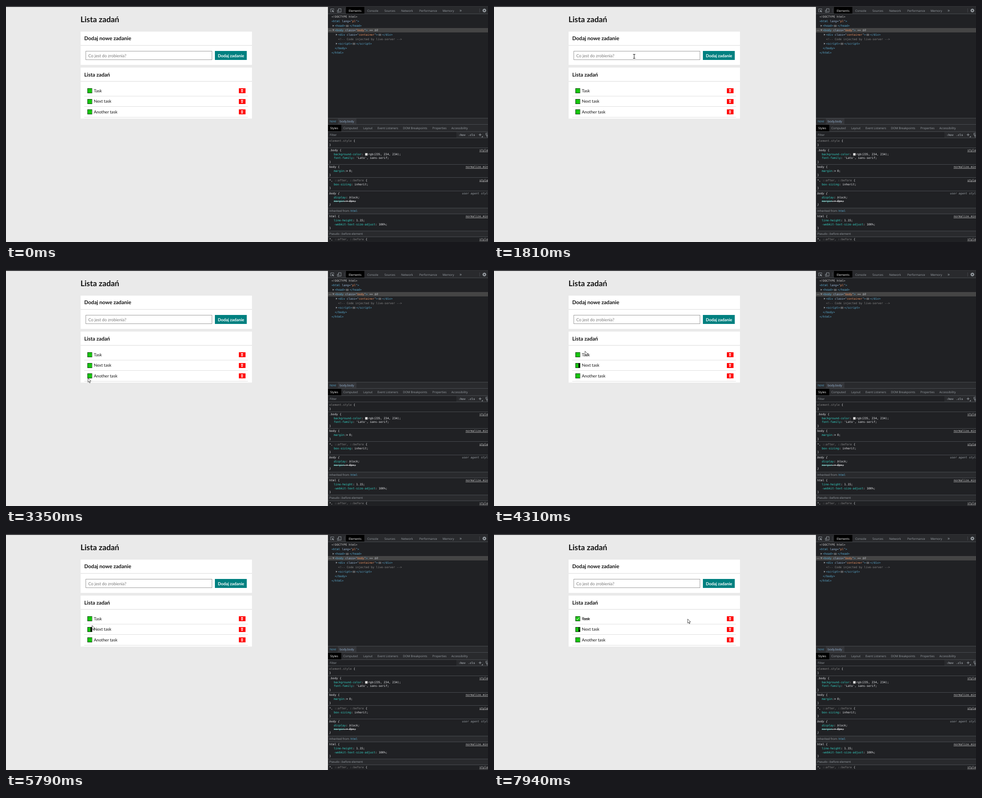
An HTML page with a canvas for the animation above (7990 ms loop, 1066x525 px).

```html
<!DOCTYPE html>
<html lang="pl">
<head>
<meta charset="utf-8">
<title>Lista zadań</title>
<style>
html, body { margin: 0; width: 100%; height: 100%; overflow: hidden; background: #eaeaea; }
canvas { display: block; }
</style>
</head>
<body>
<canvas id="stage" width="1066" height="525"></canvas>
<script>
const W = 1066, H = 525, LOOP = 7990;
const stage = document.getElementById('stage').getContext('2d');
const backdrop = document.createElement('canvas');
backdrop.width = W;
backdrop.height = H;
let g = backdrop.getContext('2d');

const lato = (px, weight = 400) => `${weight} ${px}px Lato, sans-serif`;
const UI = '6.5px "Open Sans", sans-serif';
const MONO = '6.34px "DejaVu Sans Mono", monospace';
const CHAR = 3.817;
const PANEL = '#202124', BAR = '#292a2d', EDGE = '#494c50';
const LIGHT = '#e8eaed', GREY = '#9aa0a6', TAG = '#5db0d7', ATTR = '#9bbbdc',
      VALUE = '#f29766', PROP = '#35d4c7', DIM = '#898989';

function box(x, y, w, h, color) {
  g.fillStyle = color;
  g.fillRect(x, y, w, h);
}

function frame(x, y, w, h, color, width = 1) {
  g.strokeStyle = color;
  g.lineWidth = width;
  g.strokeRect(x, y, w, h);
}

function text(str, x, y, font, color) {
  g.textRendering = 'geometricPrecision';
  g.font = font;
  g.fillStyle = color;
  g.fillText(str, x, y);
}

function shape(points, fill, stroke, width = 1) {
  g.beginPath();
  points.forEach(([x, y]) => g.lineTo(x, y));
  if (fill) {
    g.closePath();
    g.fillStyle = fill;
    g.fill();
  }
  if (stroke) {
    g.strokeStyle = stroke;
    g.lineWidth = width;
    g.stroke();
  }
}

// Draws coloured monospace runs, y being the middle of the line.
function code(x, y, ...runs) {
  for (const [str, color, style = ''] of runs) {
    text(str, x, y + 2.2, `${style} ${MONO}`, color);
    x += str.length * CHAR;
  }
  return x;
}

function triangle(x, y, open) {
  shape(open ? [[x - 2, y - 1.5], [x + 2, y - 1.5], [x, y + 2]]
             : [[x - 1.3, y - 2], [x + 1.8, y], [x - 1.3, y + 2]], GREY);
}

function pill(x, y) {
  g.beginPath();
  g.roundRect(x, y - 2.5, 7, 5.5, 2);
  g.fillStyle = '#45474a';
  g.fill();
  for (let i = 0; i < 3; i++) box(x + 1.2 + i * 1.8, y, 1, 1, '#bdc1c6');
}

function tabs(y, entries) {
  entries.forEach(([label, x], i) => text(label, x, y, UI, i ? GREY : '#ffffff'));
}

function drawPage() {
  box(0, 0, W, H, '#eaeaea');
  box(0, 0, W, 2, '#2d2d30');
  text('Lista zadań', 164.7, 36, lato(17.34, 700), '#111');

  box(165, 57, 379, 74, '#fff');
  box(165, 87, 379, 1.2, '#dedede');
  text('Dodaj nowe zadanie', 173, 76, lato(11.56, 700), '#111');
  frame(176.5, 100.5, 279, 19, '#999');
  text('Co jest do zrobienia?', 182, 113.7, lato(9.25), '#757575');
  box(462, 100, 70.5, 20, '#008080');
  text('Dodaj zadanie', 468.5, 113.5, lato(9.25, 700), '#fff');

  box(165, 137, 379, 113.5, '#fff');
  box(165, 167, 379, 1.2, '#dedede');
  text('Lista zadań', 173, 156.6, lato(11.56, 700), '#111');
  ['Task', 'Next task', 'Another task'].forEach((name, i) => {
    const y = 188.4 + i * 23.6;
    frame(180.5, Math.round(y - 5.4) + .5, 9.6, 10, '#0b3a0b');
    box(181, Math.round(y - 5.4) + 1, 8.7, 9, '#16c60c');
    text(name, 194.3, y + 3.2, lato(9.25), '#111');
    box(515, Math.round(y - 5.4), 14.7, 11, '#f00');
    frame(520.5, y - 2, 3, 5, '#fff', .9);
    box(519.5, y - 3.2, 5, 1, '#fff');
    box(521.7, y - 1, .7, 3.5, '#fff');
    box(173, Math.round(y + 11.4), 362, 1, '#dedede');
  });
}

function drawToolbar() {
  box(712, 2, W - 712, 523, PANEL);
  box(712, 2, W - 712, 15, BAR);
  box(712, 17, W - 712, 1, EDGE);
  box(752, 2, 40.5, 15, '#000');
  tabs(12.5, [['Elements', 758], ['Console', 799], ['Sources', 837], ['Network', 874],
    ['Performance', 914], ['Memory', 965.5]]);
  text('»', 1003, 12.5, '10px "Open Sans", sans-serif', GREY);
  shape([[720, 13], [718, 13], [718, 6.5], [725, 6.5], [725, 8.5]], null, GREY, .9);
  shape([[720.5, 9], [726, 11], [723.7, 11.8], [725.5, 13.7], [724.5, 14.3], [723, 12.5], [722, 14]], GREY);
  frame(735.5, 6, 5.5, 7.5, GREY, .9);
  box(732.5, 9, 4, 5.5, BAR);
  frame(733, 9.3, 3, 4.6, GREY, .9);
  box(748, 5.5, .8, 9, EDGE);
  box(1047, 5.5, .8, 9, EDGE);
  g.strokeStyle = GREY;
  g.lineWidth = 2;
  g.beginPath();
  g.arc(1058, 10, 2.5, 0, 7);
  g.stroke();
  for (let i = 0; i < 8; i++) {
    const a = i * Math.PI / 4;
    shape([[1058 + 3 * Math.cos(a), 10 + 3 * Math.sin(a)],
           [1058 + 4.3 * Math.cos(a), 10 + 4.3 * Math.sin(a)]], null, GREY, 1.5);
  }
}

function drawTree() {
  const row = i => 24 + i * 9.95;
  const folded = (x, y, name, attrs = []) => {
    triangle(x - 3.5, y);
    const end = code(x, y, ['<' + name, TAG], ...attrs, ['>', TAG]);
    pill(end + 1, y);
    code(end + 9.8, y, [`</${name}>`, TAG]);
  };
  const attr = (name, value) => [[` ${name}`, ATTR], ['="', ATTR], [value, VALUE], ['"', ATTR]];

  box(712, 49, W - 712, 9.8, '#454545');
  code(720, row(0), ['<!DOCTYPE html>', '#d0d0d0']);
  code(720, row(1), ['<html', TAG], ...attr('lang', 'pl'), ['>', TAG]);
  folded(727.3, row(2), 'head');
  for (let i = 0; i < 3; i++) box(714 + i * 2.2, row(3), 1.1, 1.1, GREY);
  triangle(724, row(3), true);
  code(727.3, row(3), ['<body', TAG], ...attr('class', 'body'), ['>', TAG],
    [' == ', '#bdc1c6'], ['$0', '#bdc1c6', 'italic']);
  folded(734.5, row(4), 'div', attr('class', 'container'));
  code(734.5, row(5), ['<!-- Code injected by live-server -->', DIM]);
  folded(734.5, row(6), 'script');
  code(727.3, row(7), ['</body>', TAG]);
  code(720, row(8), ['</html>', TAG]);
}

function drawStyleBars() {
  box(712, 249, W - 712, 44, BAR);
  box(712, 249, W - 712, 1, EDGE);
  box(734, 250, 41, 13, '#35363a');
  text('html', 716, 258.7, UI, TAG);
  text('body.body', 738, 258.7, UI, ATTR);
  box(712, 263, W - 712, 1, EDGE);
  box(712, 264, 29.5, 15, '#000');
  tabs(273.8, [['Styles', 717], ['Computed', 746], ['Layout', 790], ['Event Listeners', 821.5],
    ['DOM Breakpoints', 878], ['Properties', 943], ['Accessibility', 985]]);
  box(712, 279, W - 712, 1, EDGE);
  box(712, 280, 284, 13, PANEL);
  text('Filter', 716, 289, UI, GREY);
  code(1001, 286.5, [':hov', GREY, 'bold']);
  code(1022, 286.5, ['.cls', GREY, 'bold']);
  box(1045.5, 286, 6, 1, GREY);
  box(1048, 283.5, 1, 6, GREY);
  shape([[1054.5, 289], [1054.5, 292], [1051.5, 292]], GREY);
  frame(1061.5, 283, 6, 4, GREY, .9);
  frame(1063.5, 287, 3, 4, GREY, .9);
  box(712, 293, W - 712, 1, EDGE);
}

function drawRules() {
  const line = y => box(712, y, W - 712, 1, EDGE);
  const selector = (y, str, color = LIGHT, style) => code(715, y, [str, color, style], [' {', LIGHT, style]);
  const close = (y, style) => code(715, y, ['}', LIGHT, style]);
  const prop = (y, name, value, style) =>
    code(725, y, [name, PROP, style], [': ', LIGHT, style], [value, LIGHT, style]);
  const margin = (y, value, style) => {
    code(725, y, ['margin', PROP, style], [':', LIGHT, style]);
    triangle(754.5, y);
    code(759, y, [value, LIGHT, style]);
  };
  const link = (y, str) => {
    const x = W - str.length * CHAR;
    code(x, y, [str, '#d0d0d0']);
    box(x, y + 3, W - x, .7, '#d0d0d0');
  };
  const everything = y => {
    code(715, y, ['*, ', LIGHT], ['::after, ::before', DIM], [' {', LIGHT]);
    link(y, 'style');
  };
  const band = (y, str) => {
    box(712, y, W - 712, 13, BAR);
    line(y);
    line(y + 13);
    text(str, 715, y + 9, UI, GREY);
  };

  selector(300, 'element.style', DIM);
  close(309);
  line(315);

  selector(321, '.body');
  link(321, 'style');
  code(725, 330, ['background-color', PROP], [':', LIGHT]);
  box(794, 327, 6, 6, '#777');
  box(794.7, 327.7, 4.6, 4.6, '#ebeaea');
  code(801, 330, ['rgb(235, 234, 234);', LIGHT]);
  prop(338, 'font-family', "'Lato', sans-serif;");
  close(346.5);
  line(352);

  selector(358, 'body');
  link(358, 'normalize.min');
  margin(367, '0;');
  close(376);
  line(381);

  everything(387.5);
  prop(396.5, 'box-sizing', 'inherit;');
  close(405);
  line(411);

  selector(417, 'body', LIGHT, 'italic');
  code(1008.5, 417, ['user agent stylesheet', GREY, 'italic']);
  prop(426, 'display', 'block;', 'italic');
  margin(434, '8px;', 'italic');
  box(725, 434, 49, .8, LIGHT);
  close(442, 'italic');

  band(449, 'Inherited from');
  code(762, 456, ['html', TAG]);
  selector(468, 'html');
  link(468, 'normalize.min');
  prop(477, 'line-height', '1.15;');
  prop(485.5, '-webkit-text-size-adjust', '100%;');
  close(494);

  band(500, 'Pseudo ::before element');
  everything(519);
}

// Each move: first step time, last step time, step count, evenly paced path.
const moves = [
  [230, 370, 3, [[865, 460], [744, 385], [622, 306], [518, 247]]],
  [590, 800, 4, [[518, 247], [440, 177]]],
  [1000, 1480, 7, [[440, 177], [317.5, 103]]],
  [1680, 1810, 3, [[317.5, 103], [310, 112]]],
  [2740, 3350, 10, [[310, 112], [225, 200], [183, 245], [181, 240]]],
  [3620, 4360, 10, [[181, 240], [184, 226], [186, 206], [190, 170], [194, 140], [197, 119],
    [198, 119], [200, 135], [201, 162], [201, 180], [200, 181]]],
  [4430, 4500, 2, [[200, 181], [186, 185]]],
  [4640, 4640, 1, [[186, 185], [184, 187]]],
  [5070, 5070, 1, [[184, 187], [184, 189]]],
  [5390, 5790, 5, [[184, 189], [190, 203]]],
  [6190, 6600, 6, [[190, 203], [187.5, 189]]],
  [7670, 7940, 4, [[187.5, 189], [428, 188.5]]]
];

function pointerAt(t) {
  const move = moves.findLast(m => m[0] <= t);
  if (!move) return null;
  const [start, end, steps, path] = move;
  const gap = (end - start) / (steps - 1) || 1;
  const done = Math.min(steps, Math.floor((t - start) / gap + 1e-6) + 1);
  const pos = done / steps * (path.length - 1);
  const i = Math.min(path.length - 2, Math.floor(pos)), f = pos - i;
  return [0, 1].map(k => path[i][k] + (path[i + 1][k] - path[i][k]) * f);
}

const within = (t, a, b) => t >= a && t < b;

function drawTaskState(t) {
  if (within(t, 4840, 5390) || t >= 7670) {
    shape([[182, 188.5], [184.3, 191], [188.6, 185.6]], null, '#fff', 1);
    box(194.3, 188.3, 17.7, 1, '#111');
  }
  if (t >= 3784) {
    box(186.7, 207, 3.6, 10, '#0a0f0a');
    if (t >= 6190) box(188, 208, 1.6, 5.5, '#12900c');
  }
}

function drawPointer([x, y], clicking) {
  if (clicking) {
    g.beginPath();
    g.arc(x, y, 7, 0, 7);
    g.fillStyle = 'rgba(255, 240, 0, .5)';
    g.fill();
  }
  if (x > 176 && x < 456 && y > 100 && y < 120) {
    box(x - .5, y - 4.5, 1, 9, '#111');
    box(x - 2.5, y - 5, 5, 1, '#111');
    box(x - 2.5, y + 4, 5, 1, '#111');
    return;
  }
  const outline = [[0, 0], [0, 16], [3.7, 12.6], [6.2, 18.5], [8.8, 17.4], [6.3, 11.7], [11.3, 11.5]];
  shape(outline.map(([a, b]) => [x + .3 + a * .578, y + .5 + b * .578]), '#fff', null);
  g.closePath();
  g.strokeStyle = '#222';
  g.lineWidth = .8;
  g.stroke();
}

function render(t) {
  g.drawImage(backdrop, 0, 0);
  drawTaskState(t);
  const pointer = pointerAt(t);
  if (pointer) drawPointer(pointer, within(t, 4840, 4910) || within(t, 5340, 5390));
}

drawPage();
drawToolbar();
drawTree();
drawStyleBars();
drawRules();
g = stage;

const began = performance.now();
function tick() {
  render((performance.now() - began) % LOOP);
  requestAnimationFrame(tick);
}
tick();
</script>
</body>
</html>
```
